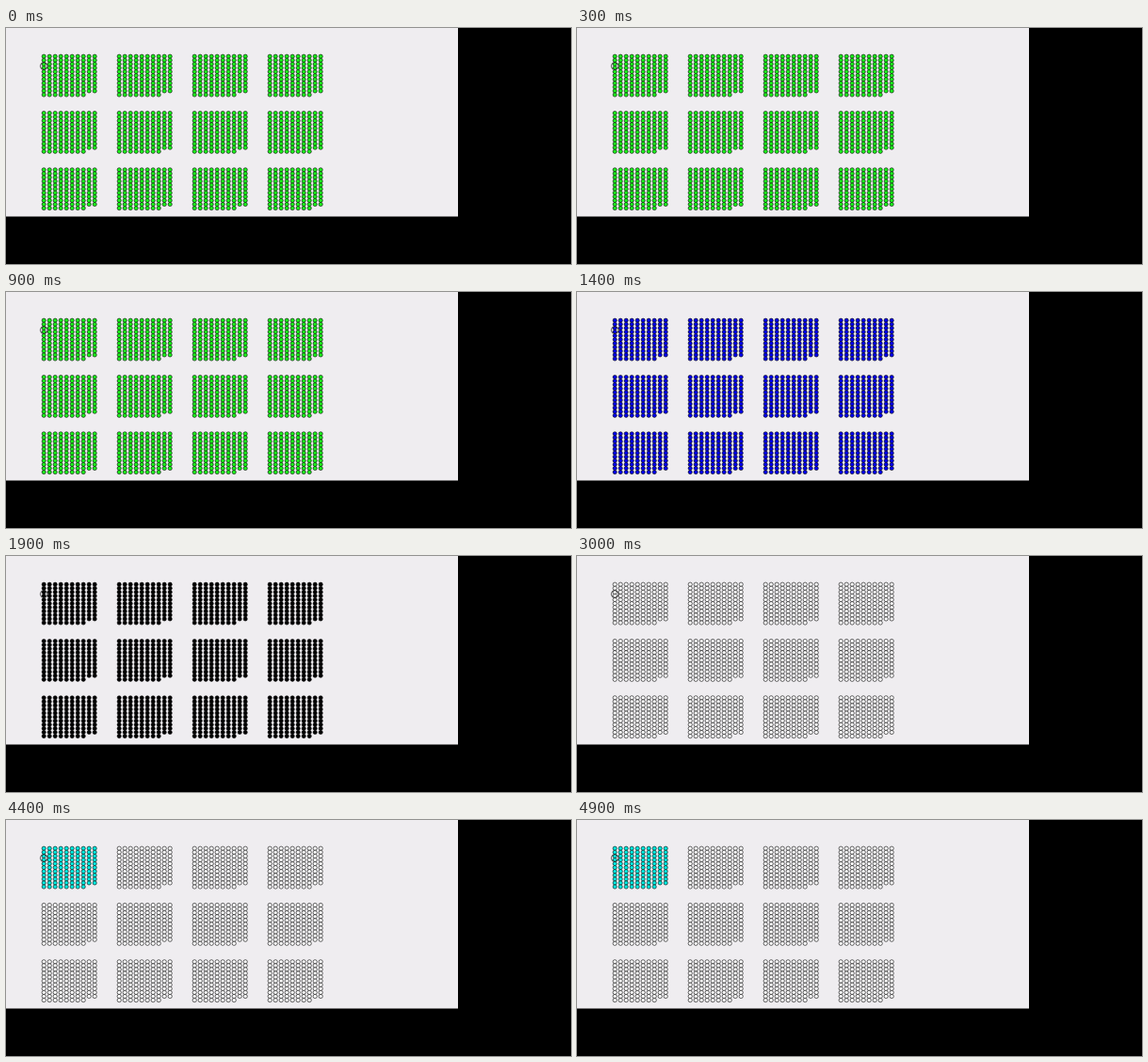
Animation, 600 px wide and 251 px high, one loop 5 s. Source, as an HTML page with a canvas:

```html
<!DOCTYPE html>
<html>
<head>
<meta charset="utf-8">
<style>
  html, body { margin: 0; width: 100%; height: 100%; overflow: hidden; background: #000; }
  canvas { display: block; }
</style>
</head>
<body>
<canvas id="stage" width="600" height="251"></canvas>
<script>
const ctx = document.getElementById('stage').getContext('2d');
const LOOP = 5000;

// Each phase recolours the panels until its end time.
const phases = [
  { end: 1000, color: '#1df51d' },
  { end: 1900, color: '#0000f0' },
  { end: 3000, color: '#000' },
  { end: 3900, color: '#fff' },
  { end: LOOP, color: '#fff', first: '#00f0e4' }
];

function circle(x, y, r) {
  ctx.beginPath();
  ctx.arc(x, y, r, 0, Math.PI * 2);
}

function drawPanel(left, top, color) {
  ctx.fillStyle = color;
  ctx.strokeStyle = '#000';
  ctx.lineWidth = 0.6;
  for (let col = 0; col < 10; col++) {
    const rows = col < 8 ? 11 : 10;
    for (let row = 0; row < rows; row++) {
      circle(left + col * 6, top + row * 4.08, 2.1);
      ctx.fill();
      ctx.stroke();
    }
  }
}

function drawCursor() {
  ctx.strokeStyle = '#222';
  ctx.lineWidth = 0.8;
  circle(40.2, 40.5, 3.8);
  ctx.stroke();
}

function draw(now) {
  const time = now % LOOP;
  const phase = phases.find(p => time < p.end);
  ctx.fillStyle = '#000';
  ctx.fillRect(0, 0, 600, 251);
  ctx.fillStyle = '#efedf0';
  ctx.fillRect(0, 0, 480, 200.5);
  for (let i = 0; i < 12; i++) {
    const color = i === 0 && phase.first || phase.color;
    drawPanel(40.2 + (i % 4) * 80, 30.2 + Math.floor(i / 4) * 60.3, color);
  }
  drawCursor();
  requestAnimationFrame(draw);
}
requestAnimationFrame(draw);
</script>
</body>
</html>
```
